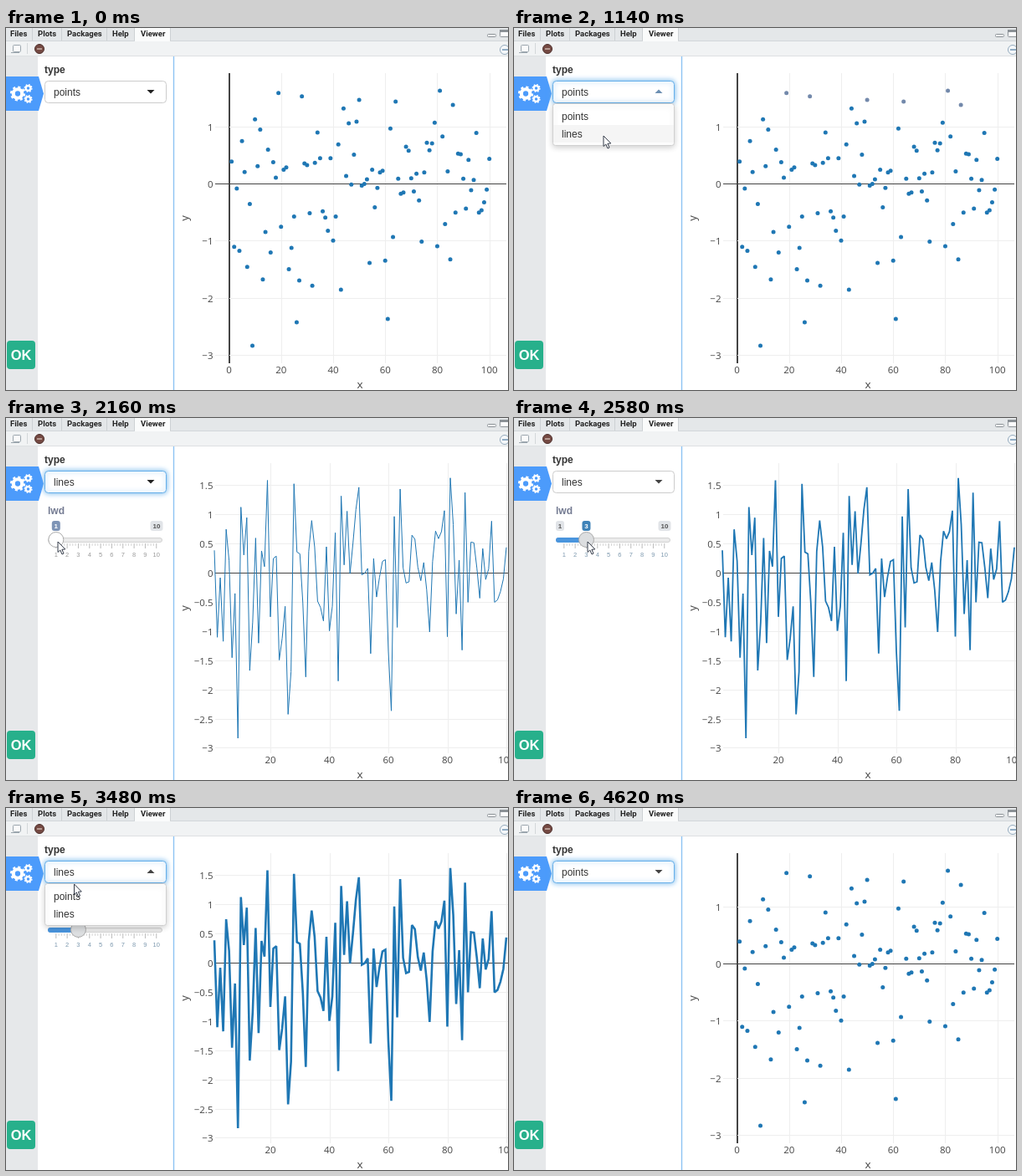
These frames come from a looping animation (600x433 px, 5100 ms). An HTML page with a canvas:

```html
<!DOCTYPE html>
<html lang="en">
<head>
<meta charset="utf-8">
<title>Plot viewer</title>
<style>
html, body { margin: 0; width: 100%; height: 100%; overflow: hidden; background: #fff; }
canvas { display: block; }
</style>
</head>
<body>
<canvas id="stage" width="600" height="433"></canvas>
<script>
const c = document.getElementById('stage').getContext('2d');
const LOOP = 5100, STEP = 60, BLUE = '#1f77b4';
const UI = '"Liberation Sans", Arial, sans-serif';
const PLOT = '"Open Sans", sans-serif';

// y values in hundredths, for x = 1..100
const data = [
  39, -110, -8, -117, 75, 21, -145, -35, -283, 113, 31, 95, -167, -84, 60, -120, 38, 11, 159, -75,
  25, 29, -149, -112, -57, -242, -169, 153, 36, 33, -51, -178, 37, 90, 45, -48, -59, -82, 45, -99,
  -57, 69, -185, 132, 14, 106, -1, 51, 109, 147, -3, 0, 8, -138, 25, -41, -7, 20, 23, -134,
  -236, 97, -93, 144, 9, -17, -15, 65, 58, 10, -13, 18, -29, -101, 20, 72, 59, 71, 107, -109,
  163, 83, -70, 22, -132, 138, -50, 53, 52, 9, -43, 42, -11, 7, 89, -50, -46, -32, -10, 44
].map(v => v / 100);

// pointer: time, x, y
const path = [
  [120, 592, 302], [480, 155.5, 63], [660, 155.5, 63], [840, 114, 100], [1140, 107, 129],
  [1680, 107, 129], [1920, 88, 164], [2160, 62, 148], [2280, 62, 148], [2580, 88, 148],
  [2700, 87, 150], [2820, 80, 199], [3180, 82, 76], [3360, 82, 76], [3600, 81, 106],
  [3960, 81, 106], [4440, 606, 420]
];

const clamp = v => Math.max(0, Math.min(1, v));
const ease = v => v * v * (3 - 2 * v);
const during = (t, a, b) => t >= a && t < b;

function rect(x, y, w, h, fill) {
  c.fillStyle = fill;
  c.fillRect(x, y, w, h);
}

function box(x, y, w, h, r, fill, stroke) {
  c.beginPath();
  c.roundRect(x, y, w, h, r);
  c.fillStyle = fill;
  c.fill();
  if (stroke) { c.strokeStyle = stroke; c.lineWidth = 1; c.stroke(); }
}

function line(x1, y1, x2, y2, color, width = 1) {
  c.beginPath();
  c.moveTo(x1, y1);
  c.lineTo(x2, y2);
  c.strokeStyle = color;
  c.lineWidth = width;
  c.stroke();
}

function shape(points, fill, stroke) {
  c.beginPath();
  points.forEach(p => c.lineTo(...p));
  c.closePath();
  c.fillStyle = fill;
  c.fill();
  if (stroke) { c.strokeStyle = stroke; c.lineWidth = 1; c.stroke(); }
}

function disc(x, y, r, fill, stroke) {
  c.beginPath();
  c.arc(x, y, r, 0, 7);
  c.fillStyle = fill;
  c.fill();
  if (stroke) { c.strokeStyle = stroke; c.lineWidth = 1; c.stroke(); }
}

function text(s, x, y, font, color, align = 'left') {
  c.font = font;
  c.fillStyle = color;
  c.textAlign = align;
  c.fillText(s, x, y);
}

function ring(x, y, r, width, dash = []) {
  c.beginPath();
  c.arc(x, y, r, 0, 2 * Math.PI);
  c.setLineDash(dash);
  c.lineWidth = width;
  c.stroke();
  c.setLineDash([]);
}

function gear(x, y, r) {
  c.strokeStyle = '#fff';
  ring(x, y, r * 0.58, r * 0.46);
  ring(x, y, r * 0.88, r * 0.26, [r * 0.88 * Math.PI / 8]);
}

function frame() {
  rect(0, 0, 600, 433, '#fff');
  rect(0, 0, 600, 16, '#e4e7e9');
  rect(0, 15, 600, 19, '#f1f3f4');
  line(0, 15.5, 600, 15.5, '#d3d7da');
  rect(154, 0, 42, 16, '#fafbfb');
  for (const x of [31.5, 66.5, 120.5, 153.5, 196.5]) line(x, 0, x, 15, '#cdd1d4');
  const tabs = { Files: 5, Plots: 38, Packages: 73, Help: 127, Viewer: 161 };
  for (const name in tabs) text(name, tabs[name], 9.5, '700 9.5px Roboto, sans-serif', '#222');

  box(575.5, 7.5, 10, 3, 1, '#fff', '#8b9196');
  box(590.5, 2.5, 12, 8, 1, '#fff', '#8b9196');
  rect(590, 2, 10, 3, '#8b9196');

  box(8.5, 20.5, 9, 8, 1, '#fbfbfb', '#9aa5ad');
  line(6, 29.5, 16, 29.5, '#9aa5ad');
  line(25.5, 18, 25.5, 31, '#d3d7da');
  disc(40, 25, 5.5, '#754a43', '#4d302c');
  line(37, 25, 43, 25, '#b59a92', 2);
  disc(596, 26, 5.5, '#f5f8fa', '#93aabd');
  line(593, 26, 600, 26, '#6f95b5', 1.5);

  rect(0, 34, 38, 399, '#e6e8ea');
  line(0, 33.5, 600, 33.5, '#dde0e2');
  line(200.5, 34, 200.5, 433, '#8dc3f2', 1.4);
  shape([[0, 58], [39, 58], [45, 78.5], [39, 99], [0, 99]], '#4c9bfb');
  gear(14, 78.5, 9);
  gear(26.5, 72, 5);
  gear(26.5, 85, 5);
  box(1, 374, 34, 34, 4, '#27b08b');
  text('OK', 18, 397, 'bold 16.5px ' + UI, '#fff', 'center');
}

function select(value, focus, open, arrow) {
  text('type', 46, 54, 'bold 12px ' + UI, '#333');
  if (focus) { c.shadowColor = '#66afe9'; c.shadowBlur = 6; }
  box(46.5, 63.5, 145, 26, 4, '#fff', focus ? '#66afe9' : '#ccc');
  c.shadowBlur = 0;
  text(value, 57, 80.5, '12px ' + UI, '#333');
  const [base, tip] = open ? [78, 73.5] : [74, 78.5];
  shape([[168.5, base], [177.5, base], [173, tip]], arrow);
}

function dropdown(y) {
  c.shadowColor = 'rgba(0,0,0,.18)';
  c.shadowBlur = 7;
  c.shadowOffsetY = 2;
  box(46.5, 90.5, 145, 50, 3, '#fff', '#d0d0d0');
  c.shadowBlur = c.shadowOffsetY = 0;
  ['points', 'lines'].forEach((name, i) => {
    const top = 95 + i * 21;
    if (y >= top && y < top + 21) rect(47, top, 144, 21, '#f5f5f5');
    text(name, 57, top + 14.5, '12px ' + UI, '#333');
  });
}

function badge(s, x, active) {
  const w = s.length * 5 + 5;
  box(x - w / 2, 123, w, 12, 3, active || '#e1e4e8');
  text(s, x, 132, 'bold 8px ' + UI, active ? '#fff' : '#555', 'center');
}

function slider(value, settled) {
  text('lwd', 50, 115, 'bold 12px ' + UI, '#747b92');
  const at = v => 59.8 + (v - 1) * 13.33, x = at(value);
  box(50.5, 143.5, 136, 5, 3, '#ebebeb', '#d2d2d2');
  if (value > 1) box(50, 143, x - 50, 6, 3, '#4a95dd');
  for (let i = 0; i <= 36; i++) {
    const tick = at(1 + i / 4), major = i % 4 === 0;
    line(tick, 150, tick, major ? 156 : 153, major ? '#aaa' : '#ccc', 0.8);
    if (major) text(1 + i / 4, tick, 165.5, '7.5px ' + UI, settled ? '#7c98ae' : '#999', 'center');
  }
  if (value > 1.6) badge('1', 55, null);
  badge('10', 180, null);
  badge(String(Math.round(value)), x, settled ? '#3f83b8' : '#7e94b6');
  disc(x, 145.5, 9, settled ? '#dcdee0' : '#fff', '#aaa');
}

function plot(points, width, faded) {
  const px = points ? x => 266.5 + x * 3.112 : x => 245.5 + x * 3.525;
  const py = points ? y => 186.5 - y * 68.4 : y => 185.5 - y * 69.8;
  const right = points ? 598 : 600;
  const font = '11.5px ' + PLOT, ink = '#444';

  for (let x = points ? 0 : 20; x <= 100; x += 20) {
    const p = Math.round(px(x)) + 0.5;
    line(p, 54, p, 401, points && !x ? ink : '#eee');
    text(x, px(x), 412.5, font, ink, 'center');
  }
  for (let y = -3; y <= 1.5; y += points ? 1 : 0.5) {
    const p = Math.floor(py(y)) + 0.5;
    if (y) line(250, p, right, p, '#eee');
    text(String(y).replace('-', '\u2212'), 247.5, py(y) + 4.5, font, ink, 'right');
  }
  if (points) line(266.5, 54, 266.5, 401, ink);
  line(250, Math.floor(py(0)) + 0.5, right, Math.floor(py(0)) + 0.5, ink);

  text('x', 423, 431, '13.5px ' + PLOT, ink, 'center');
  c.save();
  c.translate(217.5, 227.5);
  c.rotate(-Math.PI / 2);
  text('y', 0, 0, '13px ' + PLOT, ink, 'center');
  c.restore();

  if (points) {
    data.forEach((y, i) => disc(px(i + 1), py(y), 2.5, faded && y > 1.35 ? '#7389ab' : BLUE));
  } else {
    c.beginPath();
    data.forEach((y, i) => c.lineTo(px(i + 1), py(y)));
    c.strokeStyle = BLUE;
    c.lineWidth = width;
    c.lineJoin = 'miter';
    c.miterLimit = 2;
    c.stroke();
  }
}

function modebar(alpha) {
  c.globalAlpha = alpha * 0.3;
  for (let i = 0; i < 14; i++) box(285.5 + i * 22.5, 39.5, 11, 9, 2, '#fff', '#777');
  c.globalAlpha = 1;
}

function pointerAt(t) {
  const i = path.findIndex(k => k[0] > t);
  if (i < 1) return null;
  const [a, b] = [path[i - 1], path[i]];
  const k = ease((t - a[0]) / (b[0] - a[0]));
  return [a[1] + (b[1] - a[1]) * k, a[2] + (b[2] - a[2]) * k];
}

function pointer([x, y]) {
  const arrow = [[0, 0], [0, 12.5], [2.8, 10], [5, 15], [7, 14], [4.9, 9.3], [8.8, 9]];
  shape(arrow.map(p => [x + p[0], y + p[1]]), '#fff', '#333a48');
}

function draw(t) {
  const at = pointerAt(t);
  const open = during(t, 720, 1200) || during(t, 3420, 3660);
  const focus = during(t, 720, 2220) || t >= 3420;
  const lines = during(t, 1200, 3660);
  const faded = during(t, 480, 1200);

  frame();
  plot(!during(t, 1320, 3720), t < 2520 ? 1 : t < 2820 ? 1.8 : 2.6, faded);
  const shown = t < 2000
    ? clamp((t - 180) / 120) * clamp((600 - t) / 180)
    : clamp((t - 4080) / 120) * clamp((4620 - t) / 180);
  if (shown) modebar(shown);
  select(lines ? 'lines' : 'points', focus, open, faded ? '#6c8fb2' : t >= 2220 ? '#444' : '#222');
  if (during(t, 1740, 3660)) slider(1 + 2 * ease(clamp((t - 2280) / 300)), t >= 2280);
  if (open) dropdown(at[1]);
  if (at) pointer(at);
}

function tick() {
  const t = performance.now() % LOOP;
  draw(Math.floor(t / STEP) * STEP);
  requestAnimationFrame(tick);
}
tick();
</script>
</body>
</html>
```
